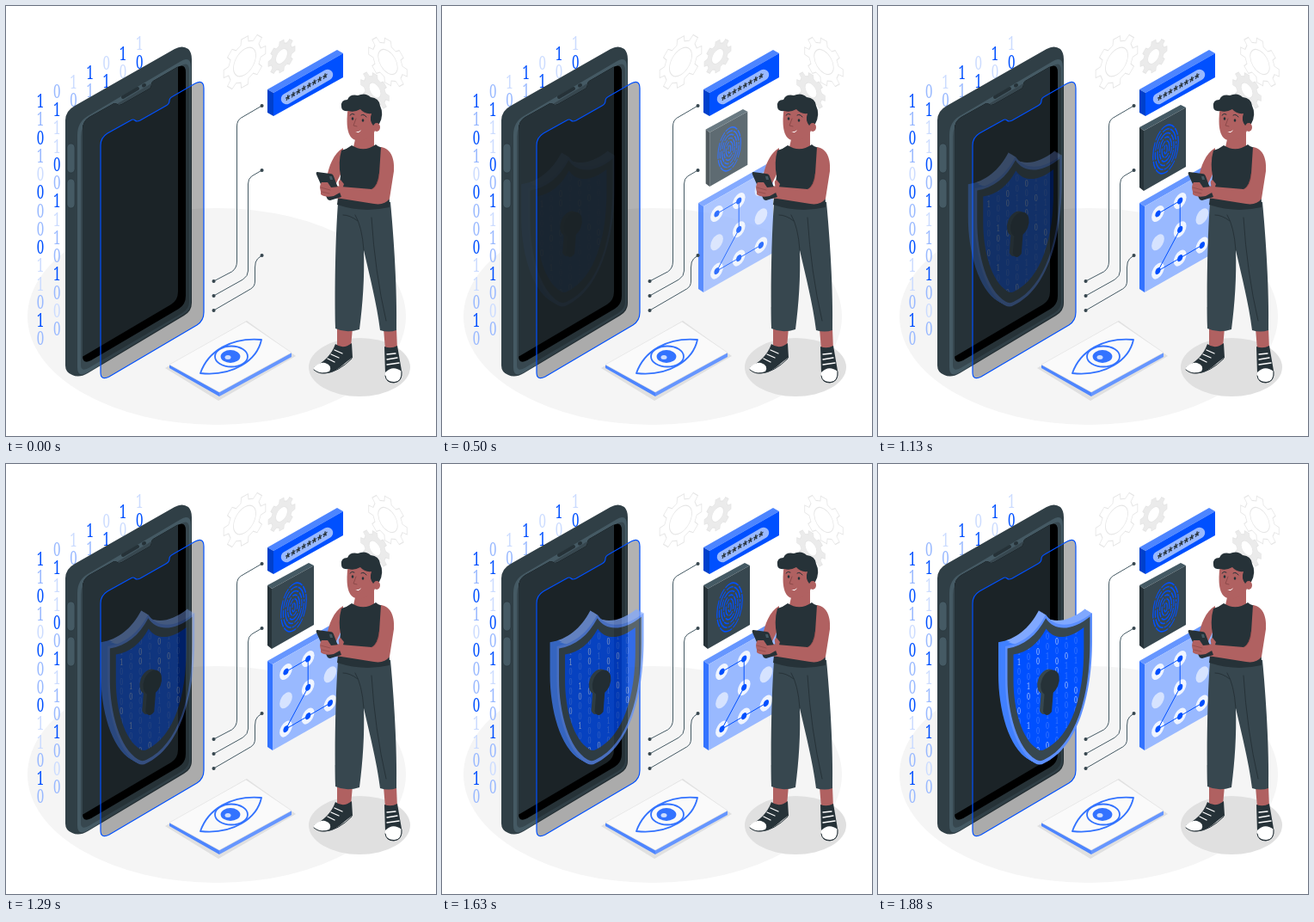
Recreate the animation shown at these times as an HTML page. Size 500 by 500 pixels, loop 1.93 s.

```html
<!DOCTYPE html>
<html lang="en">
<head>
<meta charset="utf-8">
<title>Device security</title>
<style>
html, body { margin: 0; width: 100%; height: 100%; overflow: hidden; background: #fff; }
svg { display: block; width: 100%; height: 100%; }
text { font-family: "Noto Serif", "Liberation Serif", serif; text-anchor: middle; }
.stars { font: bold 16px "Liberation Sans", Arial, sans-serif; text-anchor: start; }
.line { fill: none; stroke-linecap: round; stroke-linejoin: round; }
.skin { fill: #b06161; }
.dark { fill: #263238; }
.slate { fill: #37474f; }
.blue { fill: #0050ff; }
</style>
</head>
<body>
<svg viewBox="0 0 500 500">
  <defs>
    <path id="glass" d="M110 162Q110 153 118 148L145 133Q148 131 150 133Q152 135 156 133L186 116Q190 114 190 110Q190 107 194 105L220 90Q230 85 230 96V356Q230 366 222 371L120 431Q110 436 110 426Z"/>
    <path id="face" d="M148 212C168 209 184 196 195 175C206 192 228 190 249 173V205C249 270 232 330 193 348Q188 351 183 348C160 335 148 290 148 250Z"/>
    <clipPath id="screen"><use href="#glass" x="-21" y="-19"/></clipPath>
    <clipPath id="inner"><use href="#face" transform="translate(198 262) scale(.81) translate(-198 -262)"/></clipPath>
    <linearGradient id="edge" x2="0" y2="1">
      <stop offset=".21" stop-color="#80a8ff"/><stop offset=".21" stop-color="#4080ff"/>
    </linearGradient>
  </defs>

  <ellipse cx="245" cy="361" rx="220" ry="126" fill="#f5f5f5"/>
  <ellipse cx="411" cy="420" rx="59" ry="34" fill="#e0e0e0"/>
  <g id="gears"></g>
  <g id="digits"></g>

  <g id="phone">
    <path fill="#303f46" d="M69 133Q69 122 80 116L196 50Q205 45 212 50Q216 54 216 62V345Q216 355 207 360L95 427Q85 433 77 429Q69 426 69 418Z"/>
    <path d="M83 150Q83 135 95 128L202 65Q215 57 215 71V345Q215 354 206 359L95 426Q83 433 83 420Z" fill="#455a64"/>
    <path class="slate" d="M87 152Q87 139 97 133L204 69Q213 64 213 75V344Q213 352 205 357L96 421Q87 426 87 417Z"/>
    <rect x="71" y="160" width="9" height="34" rx="4.5" fill="#455a64" stroke="#263238" stroke-width=".6"/>
    <rect x="71" y="201" width="9" height="34" rx="4.5" fill="#455a64" stroke="#263238" stroke-width=".6"/>
    <path class="line" d="M136 106L153 96M160 92.5L161 92" stroke="#263238" stroke-width="4"/>
    <use href="#glass" x="-21" y="-19"/>
    <path class="dark" clip-path="url(#screen)" d="M60 60H200V332Q200 342 192 347L60 425Z"/>
  </g>
  <use href="#glass" fill="#000" fill-opacity=".3" stroke="#0050ff" stroke-width="1.2"/>

  <path fill="#4d85ff" d="M304 97L385 51L392 55L311 101Z"/>
  <path fill="#0040cc" d="M304 97L311 101V128L304 124Z"/>
  <path class="blue" d="M311 101L392 55V83L311 128Z"/>
  <path class="line" d="M326 108L374 80" stroke="#99b9ff" stroke-width="12.500"/>
  <text class="stars dark" transform="matrix(.866 -.5 0 1 325 116)" letter-spacing=".9">********</text>

  <g id="pattern">
    <path fill="#6696ff" d="M304 229L385 183L391 187L310 233Z"/>
    <path fill="#3373ff" d="M304 229L310 233V333L304 329Z"/>
    <path fill="#99b9ff" d="M310 233L391 187V287L310 333Z"/>
  </g>
  <g id="print">
    <path fill="#455a64" d="M304 141L352 115L358 118L309 145Z"/>
    <path class="dark" d="M304 141L309 145V215L304 211Z"/>
    <path class="slate" d="M309 145L358 118V187L309 215Z"/>
  </g>

  <g class="line" stroke="#455a64" transform="translate(.5 0)">
    <path d="M241 320L262 309Q268 305 268 297V140Q268 133 273 130L297 116"/>
    <path d="M241 337L275 318Q281 314 281 308V207Q281 201 285 198L297 191"/>
    <path d="M241 354L284 329Q289 326 289 320V304Q289 297 292 294L297 290"/>
    <path stroke="#37474f" stroke-width="4" d="M241 320h.1M241 337h.1M241 354h.1M297 116h.1M297 191h.1M297 290h.1"/>
  </g>

  <path fill="#e0e0e0" d="M185 421L280 366L337 407L247 459Z"/>
  <path fill="#4d85ff" d="M190 417L248 449V454L190 421Z"/>
  <path fill="#6696ff" d="M248 449L332 403V408L248 454Z"/>
  <path fill="#fafafa" stroke="#e0e0e0" stroke-width=".6" d="M190 417L279 367L332 403L248 449Z"/>
  <g class="line" stroke="#3373ff" stroke-width="1.800">
    <path d="M226 427C235 401 262 385 297 388C292 412 264 431 226 427Z"/>
    <ellipse cx="262" cy="407.500" rx="19" ry="12"/>
    <ellipse cx="261" cy="407.500" rx="10.500" ry="6.500" fill="#3373ff"/>
    <ellipse cx="258" cy="408.500" rx="3.500" ry="2.500" fill="#ccdcff" stroke="none"/>
  </g>

  <g id="person">
    <path class="skin" d="M385 374H403L401 397H385ZM439 375H454L455 400H441Z"/>
    <path class="slate" d="M386 228H447C451 270 455 330 454 377Q445 380 435 377C431 345 423 315 416 284C417 315 415 345 411 376Q396 381 383 375C382 330 383 270 386 229Z"/>
    <path class="line" stroke="#263238" d="M416 284Q414 256 406 243M425 246Q429 310 442 366M392 243Q400 243 409 250"/>
    <path class="dark" d="M383 393Q392 400 402 392L403 409C394 413 386 427 370 427Q358 427 358 420C369 414 378 407 383 393ZM440 396Q448 399 455 395L460 424Q462 437 451 438Q441 438 441 428Z"/>
    <path fill="#fff" d="M358 420Q365 414 371 415Q380 418 376 425Q365 429 358 423ZM441 426Q450 417 460 425Q461 437 451 437Q442 437 441 430Z"/>
    <path class="line" stroke="#fff" stroke-width="1.300" d="M374 410L382 414M378 405L387 409M382 400L391 404M443 405L453 404M443 411L455 409M443 417L457 415"/>
    <path class="line" stroke="#263238" d="M358 423Q364 428 371 427Q386 426 402 410M441 430Q442 438 451 438Q461 437 460 425"/>
    <path class="skin" d="M392 165C381 171 375 187 373 200L382 210L392 190ZM408 146L428 143V163Q417 172 404 164Z"/>
    <path class="dark" d="M390 168Q397 166 402 162Q416 171 430 161Q434 165 437 164C438 185 447 215 446 234Q415 241 385 231L389 197Q386 182 390 168Z"/>
    <path class="skin" d="M436 164C449 166 452 180 451 192L446 224Q440 232 428 230L390 224Q372 223 366 216Q363 208 371 206L389 210L425 213Q432 210 434 195Z"/>
    <path class="dark" d="M362 193L377 195Q380 195 381 198L390 222L377 226Q374 226 373 223L361 196Q360 193 362 193Z"/>
    <path fill="#455a64" d="M376 198l3 0l1 4l-3 0Z"/>
    <path class="skin" d="M367 205Q364 209 366 213L366 219Q371 223 381 221L390 216L393 207L389 202Q385 203 388 210L378 211L374 205Z"/>
    <path class="line" stroke="#8c4a4a" stroke-width=".7" d="M366 211L377 214M367 216L376 218M434 195Q433 209 426 213"/>
    <path class="skin" d="M398 116C395 136 396 154 407 156C419 158 428 151 431 140L430 116Z"/>
    <path class="dark" d="M398 122Q390 123 390 117Q389 109 397 109Q400 102 409 104Q418 100 424 106Q434 107 435 116Q440 126 434 137L427 139Q422 133 425 125Q417 126 412 120Q405 124 398 122Z"/>
    <ellipse class="skin" cx="431" cy="141" rx="4" ry="5"/>
    <path class="line" stroke="#263238" d="M400 127Q402 124 405 126M413 127Q416 125 419 129"/>
    <ellipse class="dark" cx="403" cy="131" rx="1.300" ry="1.800"/>
    <ellipse class="dark" cx="415" cy="133" rx="1.300" ry="1.800"/>
    <path class="line" stroke="#8c4a4a" d="M407 131L404 139L408 140"/>
    <path fill="#fff" d="M406 146Q410 147 413 144Q411 149 406 146Z"/>
  </g>

  <g id="shield"></g>
</svg>

<script>
const LOOP = 1930;
const $ = id => document.getElementById(id);
const add = (id, markup) => $(id).insertAdjacentHTML("beforeend", markup);
const iso = (x, y, tilt = -.5) => `transform="matrix(.866 ${tilt} 0 1 ${x} ${y})"`;
const narrow = (x, y) => `transform="matrix(.72 0 0 1 ${x} ${y})"`;

function gear(x, y, r, hole, tilt, filled) {
  const teeth = 8, pts = [];
  for (let i = 0; i < teeth; i++)
    for (const [a, k] of [[-.3, .78], [-.2, 1], [.2, 1], [.3, .78]]) {
      const t = (i + a) / teeth * 2 * Math.PI;
      pts.push([r * k * Math.cos(t), r * k * Math.sin(t)].map(v => v.toFixed(1)));
    }
  add("gears", `<g ${iso(x, y, tilt)} fill="${filled ? "#ebebeb" : "#fff"}" stroke="#e6e6e6">
    <polygon points="${pts.join(" ")}"/><circle r="${hole}" fill="#fff"/></g>`);
}
gear(277.5, 65, 28.5, 15, -.5, false);
gear(320.5, 58.5, 18, 8, -.5, true);
gear(444, 65, 26, 13, .5, false);
gear(429, 98, 19, 8, .5, true);

// Each column: digits, then tone per digit (2 = strong, 0 = faint)
const tones = ["#ccdcff", "#99b9ff", "#0050ff"];
[["11010000011010", "21210211200121"], ["01110011101000", "12002120112101"],
 ["10", "01"], ["11", "21"], ["01", "02"], ["10", "20"], ["10", "02"]
].forEach(([bits, tone], c) => [...bits].forEach((bit, i) =>
  add("digits", `<text font-size="21" ${narrow(40 + c * 19.2, 118 - c * 11.1 + i * 21.25)}
    fill="${tones[tone[i]]}">${bit}</text>`)));

const dots = [[0, 0], [1, 0], [1, 1], [0, 2], [1, 2], [2, 2]];
const spot = ([c, r]) => [325.5 + c * 25.7, 241.5 - c * 15 + r * 33.3];
for (let c = 0; c < 3; c++)
  for (let r = 0; r < 3; r++) {
    const on = dots.some(d => d[0] === c && d[1] === r);
    add("pattern", `<circle r="8.5" ${iso(...spot([c, r]))} fill="${on ? "#f0f5ff" : "#d6e3ff"}"/>`);
  }
add("pattern", `<polyline class="line" stroke="#0050ff" points="${dots.map(spot).join(" ")}"/>`);
dots.forEach(d => add("pattern", `<circle class="blue" r="3.6" ${iso(...spot(d))}/>`));

for (let i = 0; i < 6; i++)
  add("print", `<ellipse class="line" ${iso(334.5, 166.5)} rx="${2 + i * 3}" ry="${5 + i * 4.4}"
    stroke="#0050ff" stroke-width="1.4" stroke-dasharray="${9 + i * 2} 3 ${4 + i} 2.5" stroke-dashoffset="${i * 7}"/>`);

function buildShield() {
  const scaled = (k, fill) =>
    `<use href="#face" fill="${fill}" transform="translate(198 262) scale(${k}) translate(-198 -262)"/>`;
  let out = "", seed = 7;
  const rnd = () => (seed = seed * 16807 % 2147483647) / 2147483647;
  for (let i = 8; i > 0; i--)
    out += `<use href="#face" x="${-i}" y="${-i * .6}" fill="url(#edge)"/>`;
  out += scaled(1, "#5c8fff") + scaled(.95, "#37474f") + scaled(.81, "#0050ff");
  out += `<g clip-path="url(#inner)" fill="#b3cbff">`;
  for (let c = 0; c < 7; c++)
    for (let r = 0; r < 13; r++) {
      const bit = rnd() < .3 ? 1 : 0;
      out += `<text font-size="10" opacity="${rnd() < .3 ? .9 : .3}"
        ${narrow(164 + c * 11, 222 - c * 6 + r * 11.5)}>${bit}</text>`;
    }
  const hole = fill => `<g class="${fill}"><ellipse cx="200" cy="254" rx="10" ry="15" transform="rotate(22 200 254)"/>
    <path d="M194 262L192 288Q196 296 202 288L204 262Z"/></g>`;
  $("shield").innerHTML = out + `</g><g transform="translate(-4 -1)">${hole("slate")}</g>${hole("dark")}`;
}
buildShield();

// Overshooting cubic-bezier(.36, -.01, .5, 1.38)
function spring(x) {
  if (x >= 1) return 1;
  const curve = (s, a, b) => 3 * (1 - s) ** 2 * s * a + 3 * (1 - s) * s * s * b + s ** 3;
  let lo = 0, hi = 1;
  for (let i = 0; i < 24; i++) {
    const mid = (lo + hi) / 2;
    if (curve(mid, .36, .5) < x) lo = mid; else hi = mid;
  }
  return curve(lo, -.01, 1.38);
}

function pose(id, transform, opacity) {
  $(id).setAttribute("transform", transform);
  $(id).setAttribute("opacity", Math.max(0, Math.min(1, opacity)));
}

function draw() {
  const t = performance.now() % LOOP;
  const p = t < 80 ? 0 : spring((t + 30) / 1000);
  pose("pattern", `translate(${30 * (p - 1)} 0)`, p);
  pose("print", `translate(331 165) scale(${.5 + .5 * p}) translate(-331 -165)`, p);
  const q = Math.min(1, t / 1880) ** 2.4;
  pose("shield", `translate(${50 * (q - 1)} 0)`, q);
  requestAnimationFrame(draw);
}
draw();
</script>
</body>
</html>
```
